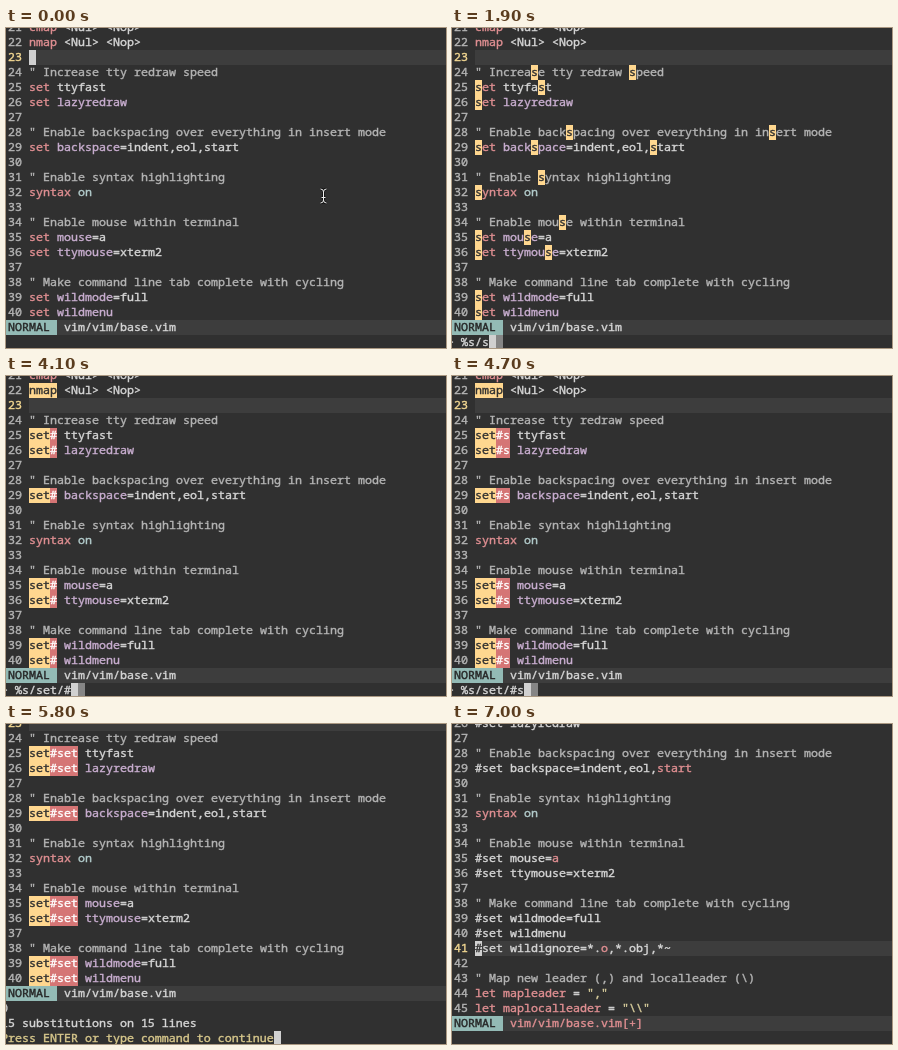
An HTML page with a canvas for the animation above (8000 ms loop, 440 by 320 pixels).

```html
<!DOCTYPE html>
<html>
<head>
<meta charset="utf-8">
<style>
html, body { margin: 0; width: 100%; height: 100%; overflow: hidden; background: #303030; }
canvas { display: block; }
</style>
</head>
<body>
<canvas id="screen" width="440" height="320"></canvas>
<script>
const ctx = document.getElementById('screen').getContext('2d');
const LOOP = 8000, CELL = 7, ROW = 15, FIRST = 21, TEXT_X = 23;
const C = {
  bg: '#303030', line: '#3d3d3d', text: '#d6d6d6', dim: '#b4b4b4', key: '#e08f92',
  option: '#c9aed0', value: '#b3cccc', yellow: '#f2d791', string: '#d8cd9c', prompt: '#d8c88c',
  match: '#ffd78f', swap: '#d57575', mode: '#93bab5', cursor: '#d0d0d0', shade: '#858585'
};

const lines = `cmap <Nul> <Nop>
nmap <Nul> <Nop>

" Increase tty redraw speed
set ttyfast
set lazyredraw

" Enable backspacing over everything in insert mode
set backspace=indent,eol,start

" Enable syntax highlighting
syntax on

" Enable mouse within terminal
set mouse=a
set ttymouse=xterm2

" Make command line tab complete with cycling
set wildmode=full
set wildmenu
set wildignore=*.o,*.obj,*~

" Map new leader (,) and localleader (\\)
let mapleader = ","
let maplocalleader = "\\\\"`.split('\n');

// Command line contents from each time on
const typed = [
  [1000, ''], [1100, '%s/'], [1900, '%s/s'], [2100, '%s/se'], [2300, '%s/set'],
  [3000, '%s/set/'], [3600, '%s/set/#'], [4700, '%s/set/#s'],
  [4900, '%s/set/#se'], [5100, '%s/set/#set']
];
const ENTER = 5800, DONE = 6800;

// Syntax rules for command lines, applied in order
const syntax = [
  [/(?<=^set )(?!ttyfast)\w+/g, C.option],
  [/(?<=^syntax )on/g, C.value],
  [/^\w+|(?<=^let )\w+/g, C.key],
  [/".*"/g, C.string]
];

function rect(x, y, w, h, color) {
  ctx.fillStyle = color;
  ctx.fillRect(x, y, w, h);
}

// A thin outline gives the text its medium weight
function write(text, x, y, color) {
  ctx.font = '11.667px "Noto Sans Mono", monospace';
  ctx.fillStyle = ctx.strokeStyle = color;
  ctx.lineWidth = 0.4;
  ctx.fillText(text, x, y + 11);
  ctx.strokeText(text, x, y + 11);
}

const toCells = (text, fg, bg) => [...text].map(ch => ({ ch, fg, bg }));

function paint(cells, regex, style) {
  const text = cells.map(c => c.ch).join('');
  for (const m of text.matchAll(regex))
    for (let i = 0; i < m[0].length; i++) Object.assign(cells[m.index + i], style);
}

function colorize(text) {
  const comment = text[0] === '"';
  const cells = toCells(text, comment ? C.dim : C.text);
  if (text[0] === '#') paint(cells, /\b(start|a|o)\b/g, { fg: C.key });
  else if (!comment) for (const [regex, fg] of syntax) paint(cells, regex, { fg });
  return cells;
}

function drawLine(number, y, current, pattern, swap, done) {
  let text = lines[number - FIRST];
  if (done) text = text.replace(/^set/, '#set');
  const cells = colorize(text);
  const marked = { fg: C.bg, bg: C.match };
  if (pattern) paint(cells, new RegExp(pattern, 'g'), marked);
  if (swap) {
    paint(cells, /^nmap/g, marked);
    if (text.startsWith('set')) cells.splice(3, 0, ...toCells(swap, '#fff', C.swap));
  }
  if (current) rect(TEXT_X, y, 440, ROW, C.line);
  write(number, 2, y, current ? C.yellow : C.dim);
  cells.forEach((c, i) => {
    const x = TEXT_X + i * CELL;
    if (c.bg) rect(x, y, CELL, ROW, c.bg);
    write(c.ch, x, y, c.fg);
  });
}

function drawPointer() {
  const beam = new Path2D('M314.5 161q3 0 3 3v8q0 3 -3 3M320.5 161q-3 0 -3 3v8q0 3 3 3M315.5 169.5h4');
  for (const [color, width] of [['#111', 2.6], ['#eee', 1]]) {
    ctx.strokeStyle = color;
    ctx.lineWidth = width;
    ctx.stroke(beam);
  }
}

function draw(t) {
  const done = t >= DONE, waiting = t >= ENTER && !done;
  const command = typed.filter(([start]) => t >= start).pop()?.[1];
  const [, pattern, swap] = done ? [] : (command ?? '').split('/');
  const top = done ? 26 : waiting ? 23 : 21;
  const last = done ? 45 : 40;
  const current = done ? 41 : 23;

  rect(0, 0, 440, 320, C.bg);
  for (let n = top; n <= last; n++)
    drawLine(n, -8 + (n - top) * ROW, n === current, pattern, swap, done);

  if (done || command === undefined) {
    const y = -8 + (current - top) * ROW;
    rect(TEXT_X, y, CELL, ROW, C.cursor);
    if (done) write('#', TEXT_X, y, C.bg);
  }

  const statusY = waiting ? 262 : 292;
  rect(0, statusY, 440, ROW, C.line);
  rect(0, statusY, 51, ROW, C.mode);
  write('NORMAL', 2, statusY, '#262626');
  write('vim/vim/base.vim' + (done ? '[+]' : ''), 58, statusY, done ? C.key : C.text);

  if (waiting) {
    write('0', -5, 277, C.text);
    write('15 substitutions on 15 lines', -5, 292, C.text);
    write('Press ENTER or type command to continue', -5, 307, C.prompt);
    rect(268, 307, CELL, ROW, C.cursor);
  } else if (!done && command !== undefined) {
    const x = 9 + command.length * CELL;
    write('> ' + command, -5, 307, C.text);
    rect(x, 307, CELL, ROW, C.cursor);
    rect(x + CELL, 307, CELL, ROW, C.shade);
  }
  if (t < 800) drawPointer();
}

function tick() {
  draw(performance.now() % LOOP);
  requestAnimationFrame(tick);
}
tick();
</script>
</body>
</html>
```
